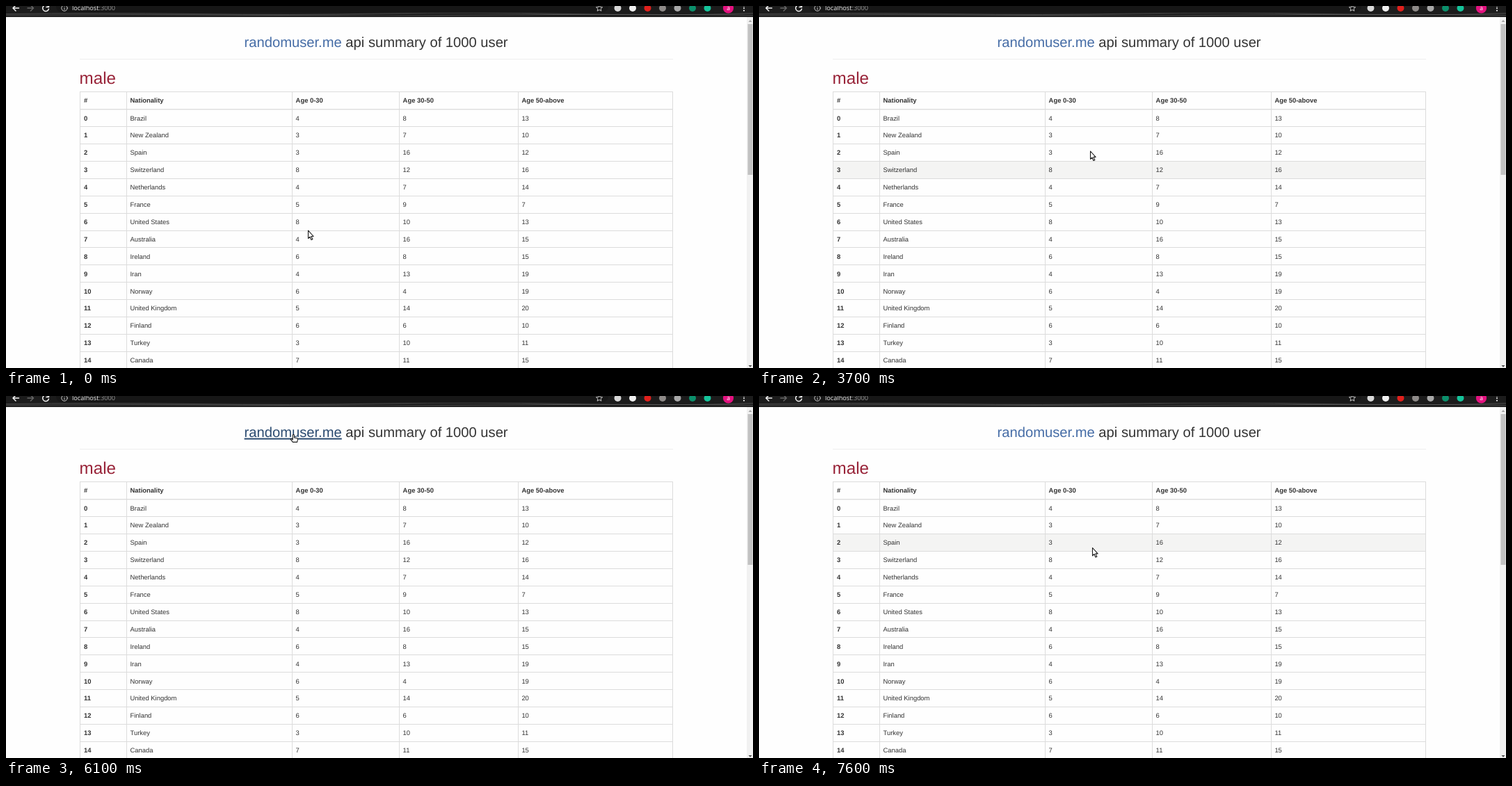
Animation of 1074x521 px, one loop 8000 ms. Source, as an HTML page:

```html
<!DOCTYPE html>
<html lang="en">
<head>
<meta charset="utf-8">
<title>User summary</title>
<style>
  html, body { margin: 0; width: 100%; height: 100%; overflow: hidden; background: #fefefe; }
  svg { display: block; width: 1074px; height: 521px; }
  text { font-family: "Liberation Sans", Arial, sans-serif; fill: #333; text-rendering: geometricPrecision; }
  .ui { font-family: "Open Sans", "Noto Sans", sans-serif; }
  .cell { font-size: 9.42px; }
  .bold { font-weight: bold; }
  #link { fill: #456ca6; }
  #link.hover { fill: #2a4a70; text-decoration: underline; }
  .line { fill: #dcdcdc; shape-rendering: crispEdges; }
  .stroke { fill: none; stroke-linecap: round; stroke-linejoin: round; }
</style>
</head>
<body>
<svg viewBox="0 0 1074 521">
  <rect width="1074" height="521" fill="#fefefe"/>

  <g id="toolbar">
    <rect width="1074" height="15.6" fill="#1c1c1c"/>
    <g class="stroke">
      <path d="M0 11.5Q130 9.5 270 11.5T540 11T810 11.5T1074 10.5" stroke="#4c4c4c"/>
      <path d="M0 13.4Q180 12 360 13.4T720 13T1074 13.4" stroke="#5e5e5e" stroke-width=".8"/>
      <path d="M0 14.8H1074" stroke="#090909" stroke-width="1.2"/>
    </g>
    <rect x="72" y="-12" width="794" height="21.5" rx="9" fill="#171717"/>
    <g class="stroke" stroke="#f2f2f2" stroke-width="1.5">
      <path d="M18.5 3H10M14 -1L10 3L14 7"/>
      <path d="M31 3H39.5M35.5 -1L39.5 3L35.5 7" stroke="#666"/>
      <path d="M60.5 .3A4.4 4.4 0 1 0 61.4 4.2M61.5 -2V1.4H58"/>
      <g stroke="#c8c8c8" stroke-width="1">
        <circle cx="84" cy="3" r="4.2"/>
        <path d="M84 2.8V5.2M84 .8V.9"/>
        <path d="M853 -1.6L854.3 1.5L857.6 1.8L855.1 4L855.9 7.2L853 5.5L850.1 7.2L850.9 4L848.4 1.8L851.7 1.5Z"/>
      </g>
    </g>
    <text class="ui" x="95" y="6.4" font-size="9.2" style="fill:#ededed">localhost<tspan fill="#999">:3000</tspan></text>
    <g id="badges"></g>
    <circle cx="1038.5" cy="3" r="7.6" fill="#e3127f"/>
    <text class="ui" x="1038.5" y="5.6" font-size="8.5" text-anchor="middle" style="fill:#fff">a</text>
    <g fill="#eee"><circle cx="1061" cy="-.6" r="1.1"/><circle cx="1061" cy="3" r="1.1"/><circle cx="1061" cy="6.6" r="1.1"/></g>
  </g>

  <text x="342.6" y="58.6" font-size="20.18"><tspan id="link">randomuser.me</tspan> api summary of 1000 user</text>
  <rect x="106" y="76" width="853" height="1" fill="#eee"/>
  <text x="105.6" y="111.6" font-size="24.2" style="fill:#982338">male</text>

  <rect id="mark" x="106" width="853" height="25" fill="#f4f4f3" visibility="hidden"/>
  <g id="table"></g>

  <rect x="1065" y="16" width="9" height="505" fill="#f1f1f1"/>
  <rect x="1066.5" y="26" width="7" height="217" fill="#c1c1c1"/>
  <path d="M1067.5 23L1070 20L1072.5 23Z" fill="#a3a3a3"/>
  <path d="M1067.5 517L1070 520L1072.5 517Z" fill="#505050"/>

  <g id="status" opacity="0">
    <path d="M0 509.5H113.5Q116 509.5 116 512V521H0Z" fill="#444443"/>
    <text class="ui" x="2.3" y="519.4" font-size="10.05" style="fill:#e4e4e4">https://randomuser.me</text>
  </g>

  <g id="cursor">
    <path id="arrow" class="stroke" d="M.5 .5V11.9L3 9.5L4.9 14L6.8 13.2L4.9 8.9H8.1Z" style="fill:#fff" stroke="#1c1c1c" stroke-width="1.1"/>
    <path id="hand" class="stroke" d="M-.8 7V.2Q.3 -1.2 1.4 .2V4L5.4 4.7Q6.6 5 6.5 6.5L5.6 10.4H-.6L-3.7 6.7Q-3.6 5.2 -2.2 5.8Z" style="fill:#fff" stroke="#1c1c1c" stroke-width="1.1"/>
  </g>
</svg>

<script>
const NS = "http://www.w3.org/2000/svg";
const $ = id => document.getElementById(id);

function add(parent, tag, attrs, text) {
  const el = document.createElementNS(NS, tag);
  for (const k in attrs) el.setAttribute(k, attrs[k]);
  if (text !== undefined) el.textContent = text;
  parent.appendChild(el);
  return el;
}

const TOP = 148.8, PITCH = 24.89;
const columns = [112, 178.5, 416.6, 570.6, 741.4];
const people = [
  "Brazil,4,8,13", "New Zealand,3,7,10", "Spain,3,16,12", "Switzerland,8,12,16",
  "Netherlands,4,7,14", "France,5,9,7", "United States,8,10,13", "Australia,4,16,15",
  "Ireland,6,8,15", "Iran,4,13,19", "Norway,6,4,19", "United Kingdom,5,14,20",
  "Finland,6,6,10", "Turkey,3,10,11", "Canada,7,11,15"
];
const rowTop = i => Math.floor(TOP + PITCH * i);

function addRow(cells, y, head) {
  cells.forEach((cell, c) => add($("table"), "text",
    { x: columns[c], y, class: head || c === 0 ? "cell bold" : "cell" }, cell));
}

function buildTable() {
  const line = (x, y, width, height) => add($("table"), "rect", { x, y, width, height, class: "line" });
  line(106, 123, 853, 1);
  add($("table"), "rect", { x: 106, y: 148, width: 853, height: 1.4, fill: "#dcdcdc" });
  for (const x of [106, 173, 411, 565, 736, 958]) line(x, 123, 1, 398);
  addRow(["#", "Nationality", "Age 0-30", "Age 30-50", "Age 50-above"], 139.4, true);
  people.forEach((p, i) => {
    addRow([i, ...p.split(",")], 164.6 + PITCH * i);
    if (i) line(106, rowTop(i), 853, 1);
  });
}

function buildBadges() {
  const colors = ["#d8d8d8", "#f0f0f0", "#e0201c", "#8e8a88", "#a8a8a8", "#0c8f6b", "#15c39a"];
  colors.forEach((fill, i) => add($("badges"), "circle", { cx: 879.5 + 21.5 * i, cy: 3, r: 5, fill }));
}

// Pointer stops: tick (100 ms), x, y, easing into the stop
const smooth = u => u * u * (3 - 2 * u);
const slow = u => 1 - (1 - u) * (1 - u);
const stops = [
  [0, 434, 322.6], [21, 434, 322.6], [22, 446, 318], [27, 475, 234], [36, 475, 234],
  [37, 476, 208.5], [40, 478, 160, slow], [42, 478, 160], [48, 476, 258], [52, 476, 258],
  [53, 476, 251], [61, 413, 56], [70, 413, 56], [76, 479, 218], [80, 479, 218]
];

function pointer(tick) {
  const n = Math.max(1, stops.findIndex(s => s[0] >= tick));
  const a = stops[n - 1], b = stops[n];
  const u = (b[3] || smooth)((tick - a[0]) / (b[0] - a[0]));
  return { x: a[1] + (b[1] - a[1]) * u, y: a[2] + (b[2] - a[2]) * u };
}

const show = (el, on) => el.setAttribute("visibility", on ? "visible" : "hidden");

function statusOpacity(tick) {
  if (tick < 63 || tick > 73) return 0;
  return tick === 63 || tick === 73 ? 0.5 : 1;
}

function draw(tick) {
  const p = pointer(tick);
  // Hover reacts one tick after the pointer
  const h = pointer(Math.max(0, tick - 1));
  const onLink = h.x > 343 && h.x < 483 && h.y > 38 && h.y < 66;
  const row = Math.floor((h.y - TOP) / PITCH);
  const onRow = tick >= 22 && row >= 0;

  $("cursor").setAttribute("transform", `translate(${p.x.toFixed(2)} ${p.y.toFixed(2)})`);
  show($("arrow"), !onLink);
  show($("hand"), onLink);
  $("link").setAttribute("class", onLink ? "hover" : "");
  show($("mark"), onRow);
  if (onRow) $("mark").setAttribute("y", rowTop(row));
  $("status").setAttribute("opacity", statusOpacity(tick));
}

function loop() {
  draw(Math.floor(performance.now() % 8000 / 100));
  requestAnimationFrame(loop);
}

buildTable();
buildBadges();
loop();
</script>
</body>
</html>
```
